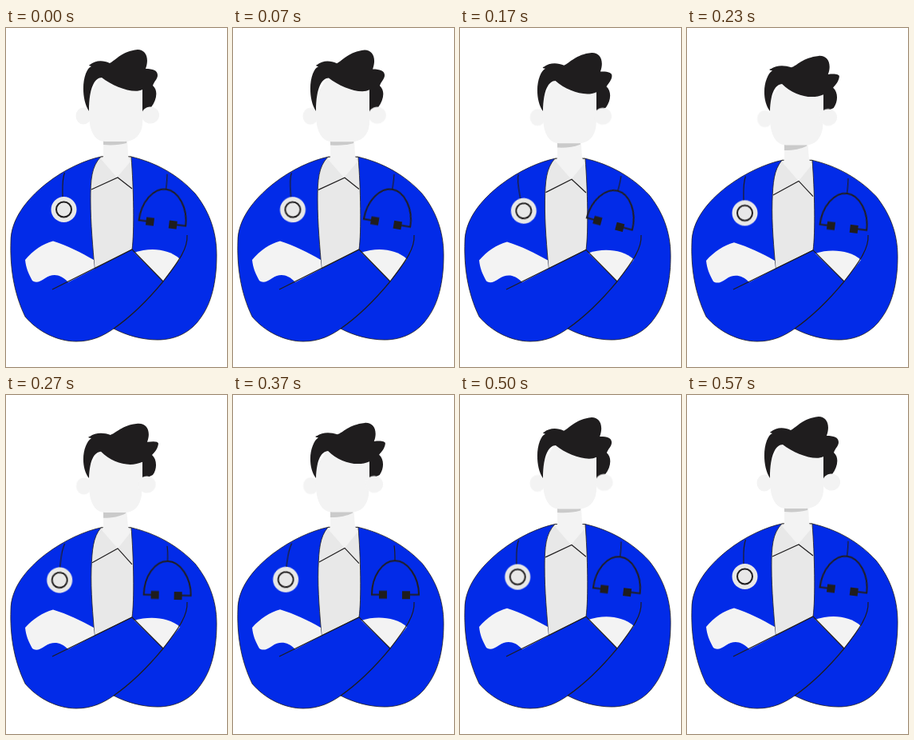
Write an HTML page without scripts that moves like this. It is 277 px wide and 424 px high and loops after 0.61 s.

```html
<!DOCTYPE html>
<html lang="en">
<head>
<meta charset="utf-8">
<title>Doctor</title>
<style>
html, body { margin: 0; width: 100%; height: 100%; overflow: hidden; background: #fff; }
svg { display: block; width: 277px; height: 424px; }

/* Breathing and pendulum curves, held at about 30 steps a second */
:root {
  --breath: linear(0 0% 4.8%, .01 4.8% 10.3%, .05 10.3% 15.7%, .13 15.7% 21.2%, .27 21.2% 26.7%,
    .45 26.7% 32.1%, .68 32.1% 37.6%, .88 37.6% 43.1%, .98 43.1% 48.5%, 1 48.5% 54%,
    .97 54% 59.4%, .88 59.4% 64.9%, .67 64.9% 70.4%, .45 70.4% 75.8%, .25 75.8% 81.3%,
    .11 81.3% 86.8%, .03 86.8% 92.2%, 0 92.2% 100%);
  --swing: linear(0 0% 4.8%, .14 4.8% 10.3%, .33 10.3% 15.7%, .6 15.7% 21.2%, .85 21.2% 26.7%,
    1 26.7% 32.1%, .72 32.1% 37.6%, 0 37.6% 43.1%, -.72 43.1% 48.5%, -.97 48.5% 54%,
    -.98 54% 59.4%, -.87 59.4% 64.9%, -.57 64.9% 70.4%, -.28 70.4% 75.8%, -.12 75.8% 81.3%,
    -.04 81.3% 86.8%, -.01 86.8% 92.2%, 0 92.2% 100%);
}
@keyframes morph { to { d: var(--to); } }
@keyframes move { to { transform: var(--to); } }
.morph { animation: morph 610ms var(--breath) infinite; }
.move { animation: move 610ms var(--breath) infinite; }
.swing { animation: move 610ms var(--swing) infinite; }

.blue { fill: #022be8; }
.skin { fill: #f3f3f3; }
.shirt { fill: #e8e8e8; }
.dark { fill: #1f1d1e; }
.line { fill: none; stroke: #1f1d1e; stroke-width: 1.2; }
.bold { stroke-width: 2; }
.edge { stroke: #1f1d1e; stroke-width: .8; }
</style>
</head>
<body>
<svg viewBox="0 0 277 424">
  <!-- coat -->
  <path class="blue edge morph"
    d="M119 161C100 165 74 176 50 195C25 215 6 240 6 267C5 297 9 330 24 361C40 380 65 392 88 392C108 392 122 385 135 376C152 385 172 390 190 390C212 390 232 381 245 361C260 340 264 310 264 284C264 252 253 227 237 207C215 183 187 168 157 161Z"
    style="--to:path('M119 166C100 170 74 181 50 199C25 218 6 242 6 269C5 298 9 330 24 361C40 380 65 392 88 392C108 392 122 385 135 376C152 385 172 390 190 390C212 390 232 381 245 361C260 340 264 311 264 286C264 255 253 231 237 211C215 188 187 173 157 166Z')"/>

  <!-- shirt, neck, collar -->
  <path class="shirt edge morph"
    d="M119 161C107 173 106 190 106 215C106 245 109 275 111 301L158 277C161 255 160 200 157 161Z"
    style="--to:path('M119 166C109 178 108 194 107 217C106 246 109 275 111 301L158 278C161 257 160 203 157 166Z')"/>
  <path class="skin morph"
    d="M122 138L122 161L119 164L139 187L156 167L153 160L152 138Z"
    style="--to:path('M122 142L122 165L120 169L140 192L157 171L153 165L151 142Z')"/>
  <path class="line morph" d="M107 202L140 187L158 201" style="--to:path('M108 210L140 192L158 212')"/>
  <path fill="#cacaca" class="morph"
    d="M122 138L152 138L151 144C143 146 133 147 122 146Z"
    style="--to:path('M122 142L151 142L150 148C143 152 133 154 122 154Z')"/>

  <!-- head -->
  <ellipse class="skin move" cx="97" cy="110" rx="9.5" ry="10.5" style="--to:translate(.5px,4px)"/>
  <path class="skin morph"
    d="M104 85C104 95 103 108 105 120C107 133 114 142 124 142L148 142C161 142 170 134 171 120C172 105 172 85 171 70L120 58Z"
    style="--to:path('M104 91C104 100 103 113 105 125C107 138 114 147 124 147L148 147C161 147 168 139 170 125C171 109 172 92 171 80L120 67Z')"/>
  <path class="dark morph"
    d="M104 104C96 92 95 70 100 57C102 52 104 49 107 48C103 47 104 46 105 46C112 40 122 40 130 44C138 40 145 29 165 27C175 27 180 37 175 51C184 51 190 53 190 59C190 64 186 66 184 72C191 78 189 90 182 99C178 101 174 103 171 105L171 77C160 83 134 73 120 62C112 62 104 73 104 104Z"
    style="--to:path('M104 104C96 94 95 76 100 64C102 59 104 56 107 54C102 54 103 52 105 52C112 47 122 47 131 50C138 48 145 38 165 36C177 35 182 46 177 59C184 58 191 58 191 61C190 68 186 72 183 75C189 80 190 92 184 100C180 102 175 104 171 105L171 84C155 91 134 86 119 71C111 72 105 80 104 104Z')"/>
  <ellipse class="skin move" cx="181" cy="109" rx="11" ry="10.5" style="--to:translate(-4.5px,3px)"/>

  <!-- chest piece -->
  <g class="move" style="--to:translate(0,5px)">
    <g class="swing" style="transform:rotate(0deg);transform-origin:73px 183px;--to:rotate(-9.6deg)">
      <path class="line" d="M73.500 181C70 190 71 200 71 212"/>
      <circle class="shirt" cx="72.500" cy="227" r="16"/>
      <circle class="line bold" cx="72.500" cy="227" r="9.500"/>
    </g>
  </g>

  <!-- ear pieces -->
  <g class="move" style="--to:translate(0,6px)">
    <g class="swing" style="transform:rotate(7deg);transform-origin:204px 182px;--to:rotate(15deg)">
      <path class="line" d="M202 183C203 189 203 194 203 202"/>
      <path class="line bold" d="M188 244.500H174C174 222 187 202 203 202S233 222 233 244.500H217"/>
      <path class="dark" d="M183 239.500h10v10h-10zM212 240h10v10h-10z"/>
    </g>
  </g>

  <!-- crossed arms -->
  <path class="skin morph"
    d="M24 290C34 278 46 270 59 266.5C77 272 94 281 110 290L111 301L78 318C68 307 58 307 49 313C42 318 37 319 33 316C28 307 25 300 24 290Z"
    style="--to:path('M24 291C34 280 46 272 59 268.5C77 274 94 282 110 291L111 301L78 318C68 308 58 308 49 314C42 319 37 320 33 317C28 308 25 301 24 291Z')"/>
  <path class="skin morph"
    d="M161 281C180 274 204 276 218 289L197 317Z"
    style="--to:path('M161 282C180 276 204 278 218 290L197 317Z')"/>
  <path class="line morph" d="M58 327L158 277L197 317" style="--to:path('M58 327L158 278L197 317')"/>
  <path class="line" d="M227 259C228 275 218 290 197 317C178 340 158 360 135 376"/>
</svg>
</body>
</html>
```
